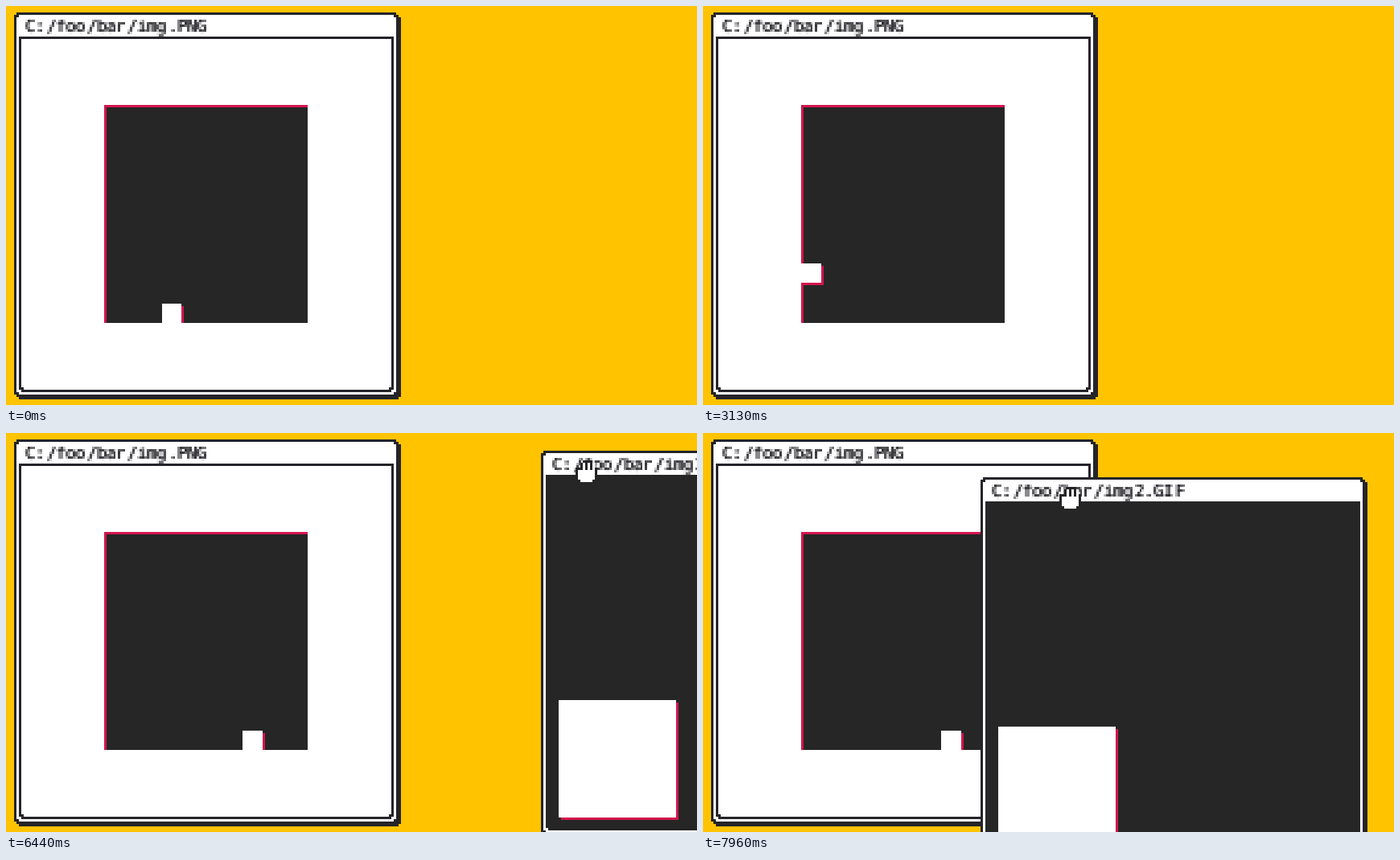
An HTML page with a canvas that plays this animation: 859x496 px, repeating every 7.99 s.

```html
<!DOCTYPE html>
<html lang="en">
<head>
<meta charset="utf-8">
<title>Image windows</title>
<style>
html, body { margin: 0; width: 100%; height: 100%; overflow: hidden; background: #ffc300; }
canvas { display: block; }
</style>
</head>
<body>
<canvas id="stage" width="859" height="496" role="img" aria-label="C:/foo/bar/img.PNG, C:/foo/bar/img2.GIF"></canvas>
<script>
const ctx = document.getElementById('stage').getContext('2d');
const LOOP = 7990, UNIT = 2.96;
const YELLOW = '#ffc300', WHITE = '#ffffff', DARK = '#262626', EDGE = '#242429', PINK = '#d3154f';

const FLOOR = 370, PEAK = 254, GRAVITY = 0.00048;
const LEFT_WALL = 122.4, RIGHT_WALL = 350;
const TOP_SPEED = 0.185, ACCEL = TOP_SPEED / 200;
const PEAK_TIMES = [1450, 2759, 4380];

const clamp = (v, lo, hi) => Math.max(lo, Math.min(hi, v));
const smooth = p => p * p * (3 - 2 * p);

function box(color, x0, y0, x1, y1) {
  ctx.fillStyle = color;
  ctx.fillRect(x0, y0, x1 - x0, y1 - y0);
}

function cutBox(color, x0, y0, x1, y1) {
  box(color, x0 + 3, y0, x1 - 3, y1);
  box(color, x0, y0 + 3, x1, y1 - 3);
}

function cell(color, x, y, w, h) {
  const at = v => Math.round(v * UNIT);
  box(color, at(x), at(y), at(x + w), at(y + h));
}

// Small type, enlarged without smoothing; drawn twice for firmer strokes.
function makeTitle(text) {
  const tile = document.createElement('canvas');
  tile.width = 84;
  tile.height = 8;
  const pen = tile.getContext('2d');
  pen.font = '7px "DejaVu Sans Mono", monospace';
  pen.fillStyle = EDGE;
  for (let pass = 0; pass < 2; pass++) {
    [...text].forEach((ch, i) => pen.fillText(ch, Math.round(i * 4.25), 5));
  }
  return tile;
}

const pngTitle = makeTitle('C:/foo/bar/img.PNG');
const gifTitle = makeTitle('C:/foo/bar/img2.GIF');

function windowFrame(title) {
  cutBox(EDGE, 3, 3, 481, 481);
  cutBox(EDGE, 0, 0, 478, 478);
  cutBox(WHITE, 3, 3, 475, 475);
  ctx.imageSmoothingEnabled = false;
  ctx.drawImage(title, 14, 9, title.width * UNIT, title.height * UNIT);
}

// Which way the runner is being steered: -1, 0 or 1.
function steer(t) {
  if (t < 390) return 0;
  if (t < 1474) return 1;
  if (t < 3175) return -1;
  if (t < 4740) return 1;
  if (t < 5037) return -1;
  return t < 7894 ? 0 : 1;
}

function runnerX(t) {
  const step = 5;
  let x = 194, speed = 0;
  for (let s = 0; s < t; s += step) {
    const dt = Math.min(step, t - s);
    const before = speed;
    speed += clamp(steer(s) * TOP_SPEED - speed, -ACCEL * dt, ACCEL * dt);
    const next = x + (before + speed) / 2 * dt;
    x = clamp(next, LEFT_WALL, RIGHT_WALL);
    if (x !== next) speed = 0;
  }
  return x;
}

function runnerY(t) {
  return Math.min(FLOOR, ...PEAK_TIMES.map(p => PEAK + GRAVITY * (t - p) ** 2));
}

function firstWindow(t) {
  ctx.save();
  ctx.translate(10, 8);
  windowFrame(pngTitle);
  cutBox(EDGE, 6, 30, 472, 472);
  box(EDGE, 6, 30, 472, 36);
  cutBox(WHITE, 9, 33, 469, 469);
  box(WHITE, 9, 33, 469, 40);
  ctx.restore();

  box(PINK, 122, 123, 375, 394);
  box(DARK, 125, 126, 375, 394);
  const x = runnerX(t), y = Math.round(runnerY(t));
  const x0 = Math.round(x), x1 = Math.round(x + 24.4);
  ctx.save();
  ctx.beginPath();
  ctx.rect(122, 123, 253, 271);
  ctx.clip();
  box(PINK, x0 + 3, y + 3, x1 + 3, y + 27);
  box(WHITE, x0, y, x1, y + 24);
  ctx.restore();
}

function hand() {
  cell(EDGE, 3, 0, 4, 1);
  cell(EDGE, 2, 1, 6, 4);
  cell(EDGE, 0, 3, 9, 4);
  cell(EDGE, 1, 7, 8, 2);
  for (let x = 3; x < 8; x += 2) cell(WHITE, x, 1, 1, 4);
  cell(WHITE, 1, 4, 7, 4);
  cell(WHITE, 2, 8, 5, 1);
}

function draggedWindow(t) {
  const left = clamp((7720 - t) / 1280, 0, 2);
  const x = 345 + 320 * left ** 2.4;
  const y = 21 + 34 * smooth(clamp((t - 6350) / 1050, 0, 1));
  const grip = 98 - 55 * left ** 1.4;
  ctx.save();
  ctx.translate(Math.round(x), Math.round(y));
  windowFrame(gifTitle);
  cutBox(DARK, 6, 30, 472, 472);
  box(DARK, 6, 30, 472, 40);
  box(PINK, 25, 313, 171, 459);
  box(WHITE, 22, 310, 168, 456);
  ctx.translate(Math.round(grip), 12);
  hand();
  ctx.restore();
}

function draw(t) {
  box(YELLOW, 0, 0, 859, 496);
  firstWindow(t);
  if (t > 6110) draggedWindow(t);
}

const start = performance.now();
function tick() {
  const t = (performance.now() - start) % LOOP;
  draw(Math.floor(t / 10) * 10);
  requestAnimationFrame(tick);
}
tick();
</script>
</body>
</html>
```
